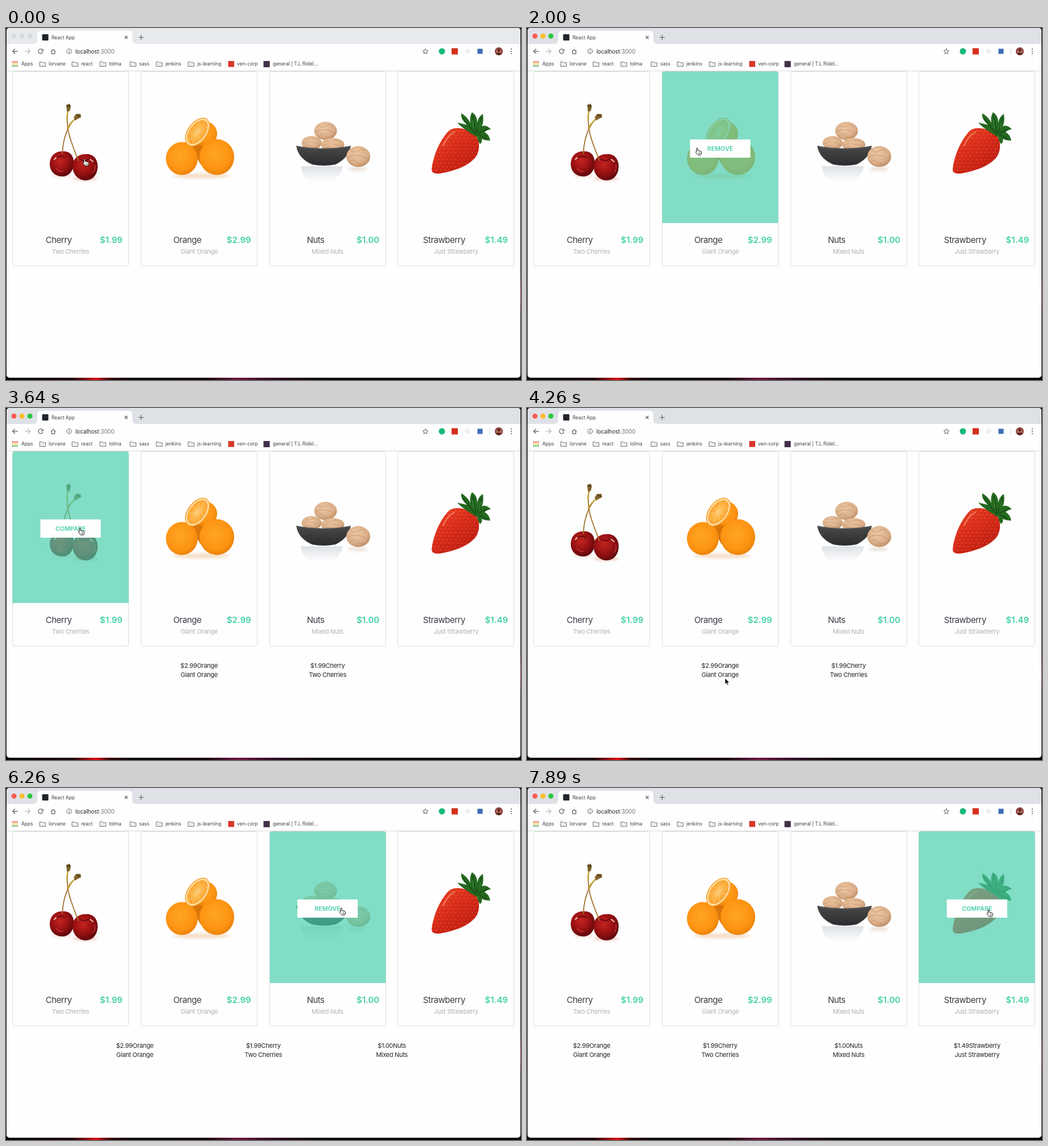
Animation, 905 px wide and 619 px high, one loop 8000 ms. Source, as an HTML page:

```html
<!DOCTYPE html>
<html lang="en">
<head>
<meta charset="utf-8">
<title>Product compare</title>
<style>
  html, body { margin: 0; width: 100%; height: 100%; overflow: hidden; background: #08040a; }
  svg { display: block; width: 100vw; height: 100vh; font-family: Inter, "Liberation Sans", sans-serif; }
  .ui { font-size: 8.4px; fill: #3c4043; }
  .name { font-size: 15px; letter-spacing: -.033em; fill: #393c45; text-anchor: middle; }
  .price { font-size: 15px; font-weight: 600; fill: #43d0a8; text-anchor: end; }
  .desc { font-size: 11px; letter-spacing: -.027em; fill: #b1b1b3; text-anchor: middle; }
  .item { font-size: 11px; letter-spacing: -.027em; fill: #212529; text-anchor: middle; }
  .label { font-size: 10.7px; font-weight: 600; text-anchor: middle; }
  .line { fill: none; stroke: #5f6368; stroke-width: 1.2; }
</style>
</head>
<body>
<svg id="stage" viewBox="0 0 905 619" preserveAspectRatio="none">
  <defs>
    <linearGradient id="desk">
      <stop offset="0" stop-color="#08040a"/><stop offset=".13" stop-color="#1c0308"/>
      <stop offset=".175" stop-color="#e00d12"/><stop offset=".2" stop-color="#3a040a"/>
      <stop offset=".24" stop-color="#0c040a"/><stop offset=".39" stop-color="#14040e"/>
      <stop offset=".45" stop-color="#6d1740"/><stop offset=".52" stop-color="#2c0a20"/>
      <stop offset=".62" stop-color="#08040a"/>
    </linearGradient>
    <linearGradient id="edge" x2="0" y2="1">
      <stop offset=".69" stop-color="#08040a"/><stop offset=".76" stop-color="#7a1747"/>
      <stop offset=".81" stop-color="#12040c"/>
    </linearGradient>
    <radialGradient id="cherry" cx=".42" cy=".38" r=".65">
      <stop offset="0" stop-color="#c3241f"/><stop offset=".55" stop-color="#9a1113"/>
      <stop offset="1" stop-color="#5a070a"/>
    </radialGradient>
    <radialGradient id="orange" cx=".45" cy=".42" r=".65">
      <stop offset="0" stop-color="#ffa526"/><stop offset=".65" stop-color="#fd9412"/>
      <stop offset="1" stop-color="#e67c06"/>
    </radialGradient>
    <radialGradient id="pulp">
      <stop offset="0" stop-color="#ffd084"/><stop offset=".45" stop-color="#fdb64a"/>
      <stop offset="1" stop-color="#fba42f"/>
    </radialGradient>
    <radialGradient id="nut" cx=".42" cy=".35" r=".75">
      <stop offset="0" stop-color="#edc8a2"/><stop offset=".6" stop-color="#dbb08a"/>
      <stop offset="1" stop-color="#b58258"/>
    </radialGradient>
    <linearGradient id="bowl" x2="0" y2="1">
      <stop offset="0" stop-color="#4b4a4b"/><stop offset="1" stop-color="#2c2b2d"/>
    </linearGradient>
    <linearGradient id="mirror" x2="0" y2="1">
      <stop offset="0" stop-color="#d3d8de"/><stop offset="1" stop-color="#fff"/>
    </linearGradient>
    <linearGradient id="berry" x2=".8" y2="1">
      <stop offset="0" stop-color="#ee4a2a"/><stop offset=".5" stop-color="#da2c1a"/>
      <stop offset="1" stop-color="#b91c12"/>
    </linearGradient>
    <radialGradient id="face"><stop offset=".3" stop-color="#c98a6c"/><stop offset="1" stop-color="#7b2a2c"/></radialGradient>
    <path id="berryShape" d="M779 180C790 172 813 176 826 190C833 199 833 214 826 226C814 242 790 251 762 256Q748 257 748 249C750 227 762 196 779 180Z"/>
    <clipPath id="berryClip"><use href="#berryShape"/></clipPath>
    <filter id="soft" x="-30%" y="-80%" width="160%" height="260%"><feGaussianBlur stdDeviation="2.2"/></filter>
  </defs>
</svg>
<script>
const stage = document.getElementById('stage');
const $ = id => document.getElementById(id);
const text = (x, y, cls, s, extra = '') => `<text x="${x}" y="${y}" class="${cls}" ${extra}>${s}</text>`;
const ball = (x, y, rx, ry, fill, extra = '') =>
  `<ellipse cx="${x}" cy="${y}" rx="${rx}" ry="${ry}" fill="${fill}" ${extra}/>`;
const box = (x, y, w, h, fill, extra = '') =>
  `<rect x="${x}" y="${y}" width="${w}" height="${h}" fill="${fill}" ${extra}/>`;
const path = (d, fill, extra = '') => `<path d="${d}" fill="${fill}" ${extra}/>`;
const curve = (d, color, width) => path(d, 'none', `stroke="${color}" stroke-width="${width}" stroke-linecap="round"`);

const LOOP = 8000, MINT = [72, 207, 173], PAGE = '#fefefe';
const STEPS = [0, 180, 840, 1040, 1230, 1370, 1540, 1700, 2000, 2600, 2750, 2900, 3050, 3190, 3640,
  3940, 4100, 4260, 4410, 4580, 4750, 4920, 5220, 5370, 5510, 5660, 5810, 5960, 6260,
  6710, 6860, 7000, 7150, 7300, 7440, 7590, 7740, 7890];

// shows: [enter, leave, press start, press end]; press = pointer over the button
const cards = [
  { name: 'Cherry', price: '$1.99', desc: 'Two Cherries', x: 11.5, mid: 113.5, art: drawCherry,
    labels: ['REMOVE', 'COMPARE'], click: 3640, shows: [[-400, 760, 9e3, 9e3], [2760, 3800, 2920, 3800]] },
  { name: 'Orange', price: '$2.99', desc: 'Giant Orange', x: 237.5, mid: 339.5, art: drawOrange,
    labels: ['COMPARE', 'REMOVE'], click: 2000, shows: [[940, 2735, 1230, 2540]] },
  { name: 'Nuts', price: '$1.00', desc: 'Mixed Nuts', x: 463.5, mid: 565, art: drawNuts,
    labels: ['COMPARE', 'REMOVE'], click: 6260, shows: [[5325, 6760, 5600, 6640]] },
  { name: 'Strawberry', price: '$1.49', desc: 'Just Strawberry', x: 688.5, mid: 790.8, art: drawBerry,
    labels: ['REMOVE', 'COMPARE'], click: 7890, shows: [[6815, 9e3, 6890, 9e3]] }
];
const picks = [cards[1], cards[0], cards[2], cards[3]];

// Pointer: time, x, y
const POINTER = [[0, 139, 236], [760, 139, 236], [1040, 262, 226], [1230, 300, 217], [2500, 300, 217],
  [2750, 222, 225], [2900, 134, 231], [3190, 131, 217], [3770, 131, 217], [3940, 150, 262],
  [4100, 256, 420], [4260, 350, 481], [4500, 351, 487], [4920, 334, 463], [5150, 334, 463],
  [5220, 400, 412], [5370, 530, 300], [5510, 601, 248], [5660, 596, 226], [5960, 590, 217],
  [6600, 590, 217], [6710, 625, 217], [7000, 831, 214], [7740, 812, 220], [8000, 812, 220]];

function drawCherry() {
  return ball(139, 265, 22, 3.5, '#f0cbc2', 'filter="url(#soft)"') +
    ball(99, 259, 17, 3.5, '#f4ddd5', 'filter="url(#soft)"') +
    path('M98 217C112 215 120 225 119 239C118 254 108 262 97 261C84 260 76 250 77 237C78 225 86 217 98 217Z', 'url(#cherry)') +
    path('M139 222C153 220 162 231 161 245C160 260 151 268 139 268C126 267 117 257 117 243C117 230 127 222 139 222Z', 'url(#cherry)') +
    curve('M90 228q7 -5 14 0M130 231q9 5 16 -1', '#6a0a0d', 1.8) +
    curve('M148 231l5 4M85 231l3 -3', '#f0c4bc', 1.8) +
    curve('M156 241q2 8 -3 13M88 247q5 6 11 5', '#c4352f', 1.6) +
    curve('M99 221C100 200 104 180 118 163', '#a0702c', 1.8) +
    curve('M127 233C117 205 103 180 109 144', '#a56f2a', 1.8) +
    curve('M108 176q4 -8 14 -17M107 160q0 -8 3 -17', '#c4a12d', 2.2) +
    path('M106 135l6 -2l2 5l-2 8l-5 1z', '#7b6129') + path('M119 157l4 -6l8 0l1 6l-6 3l-5 3z', '#846730') +
    curve('M107 137l5 0M125 154l5 1', '#4c3c1c', 2);
}

function drawOrange() {
  let wedges = '';
  for (let i = 0; i < 9; i++) {
    const a = i * Math.PI * 2 / 9;
    wedges += `M0 0L${(22 * Math.cos(a)).toFixed(1)} ${(13 * Math.sin(a)).toFixed(1)}`;
  }
  return ball(343, 260, 50, 4.5, '#f4dfc8', 'filter="url(#soft)"') +
    path('M322 204h38l-18 36z', '#d9760a') +
    ball(349, 186, 22, 22, 'url(#orange)') +
    ball(309, 229.5, 28, 29, 'url(#orange)') + ball(370.5, 227, 30.5, 31.5, 'url(#orange)') +
    `<g transform="translate(336.5 183) rotate(-54)">` + ball(0, 0, 28.5, 17.5, '#f9a22b') +
    ball(0, 0, 27, 15.8, '#fde0ac') + ball(0, 0, 24, 13.6, 'url(#pulp)') +
    curve(wedges, '#fecb78', .8) + '</g>';
}

function walnut(x, y, rx, ry) {
  return `<g transform="translate(${x} ${y}) scale(${rx / 20} ${ry / 16})">` + ball(0, 0, 20, 16, 'url(#nut)') +
    curve('M-18 2C-8 -5 6 -3 18 6M-12 -9q7 5 13 0t11 3M-14 8q6 -5 11 0t13 2', '#c0906a', .8) + '</g>';
}

function drawNuts() {
  return path('M518 243H592Q590 256 578 266Q566 273 555 270Q540 274 528 266Q519 256 518 243Z', 'url(#mirror)', 'opacity=".75"') +
    ball(618, 248, 17, 4, '#ece5df', 'filter="url(#soft)"') +
    walnut(561.5, 181, 20, 16) + walnut(537, 202, 17.5, 12) + walnut(574, 205, 20.5, 11.5) +
    path('M510 207Q558 216 606 207Q603 228 579 240Q558 244 538 240Q513 229 510 207Z', 'url(#bowl)') +
    curve('M512 208.5Q558 217 604 208.5', '#5f5e60', 1) + walnut(619, 226, 21, 18.5);
}

function drawBerry() {
  let seeds = '';
  for (let r = 0; r < 14; r++) for (let c = 0; c < 14; c++) {
    const x = 742 + c * 7.4 + (r % 2) * 3.7, y = 176 + r * 6.2;
    seeds += ball(x, y, .8, 1.1, '#ee8a45', 'opacity=".6"') + ball(x + .7, y + 1.7, 1.6, .8, '#a3160f', 'opacity=".5"');
  }
  return '<use href="#berryShape" fill="url(#berry)"/><g clip-path="url(#berryClip)">' + seeds +
    curve('M768 207q8 -18 20 -24', '#f6755a', 2.5) + '</g>' +
    path('M828 192C816 185 800 175 793 166Q803 169 810 170Q798 160 800 150Q811 156 816 167Q814 156 819 148Q829 155 828 167Q830 156 838 151Q840 165 836 173Q843 169 852 178Q845 179 841 183Q849 187 851 198Q842 198 836 195Q838 200 833 204Q829 199 828 192Z', '#25691f') +
    curve('M825 187L803 158M826 185L820 154M828 184L836 157M830 185L846 178M831 188L845 195', '#15481a', 1.5) +
    curve('M822 176l-2 -14M831 177l3 -12', '#4c9440', 1);
}

function folder(x, label) {
  return path(`M${x + .5} 59.5h4l1.3 1.4h5.2v6.6h-10.5z`, '#eceeef', 'stroke="#74787c"') +
    text(x + 16.5, 66.3, 'ui', label);
}

function drawBrowser() {
  let dots = '', lights = '';
  ['#e8453c', '#f9bb2d', '#3aa757'].forEach((c, row) => {
    for (let i = 0; i < 3; i++) dots += box(11 + i * 3.6, 58.5 + row * 3.6, 2.3, 2.3, c);
  });
  ['#fc5b57', '#fdbc2e', '#28c840'].forEach((c, i) => lights += ball(14 + i * 14, 14.3, 4.5, 4.5, c, 'class="light"'));
  const arrow = (x, dir, color) =>
    path(`M${x - 4 * dir} 41h${9 * dir}M${x} 36.8l${-4.4 * dir} 4.2l${4.4 * dir} 4.2`, 'none', `stroke="${color}" stroke-width="1.25"`);
  return box(0, 614, 905, 5, 'url(#desk)') + box(903, 0, 2, 619, 'url(#edge)') +
    box(1, 0, 903, 615, PAGE, 'rx="5"') +
    path('M1 28V5Q1 0 6 0H899Q904 0 904 5V28Z', '#dee1e6', 'id="strip"') + lights +
    path('M48 28Q55 28 55 21V11Q55 5 61 5H216Q222 5 222 11V21Q222 28 229 28Z', PAGE) +
    box(63.5, 11, 11, 11, '#20252b', 'rx="1"') + text(80, 19.6, 'ui', 'React App') +
    path('M208.7 14l5 5m0 -5l-5 5M233 16.5h9m-4.5 -4.5v9', 'none', 'class="line"') +
    arrow(16, 1, '#5f6368') + arrow(38, -1, '#babcbe') +
    path('M64 38.4A4 4 0 1 0 64.8 42M65 36.8v3.4h-3.6M79 41.5l4 -4l4 4M80.3 41v4.3h5.4V41', 'none', 'class="line"') +
    '<circle cx="111" cy="41" r="4.2" class="line" style="stroke-width:1"/>' +
    path('M111 40.5v3M111 38.5v1', 'none', 'class="line"') +
    text(122, 44.6, 'ui', 'localhost<tspan fill="#6b7075">:3000</tspan>', 'style="font-size:9.7px;fill:#202124"') +
    path('M737 36.5l1.3 3.1 3.4 .3 -2.6 2.2 .8 3.3 -2.9 -1.8 -2.9 1.8 .8 -3.3 -2.6 -2.2 3.4 -.3z', 'none', 'class="line" style="stroke-width:1"') +
    ball(766, 41, 5.5, 5.5, '#17b978') + box(783, 35.5, 11, 11, '#d5301f') + ball(811, 41, 4.5, 4.5, '#eeeff0') +
    box(828.5, 36.5, 9, 9, '#3c6db4') + box(850, 36, 1, 11, '#dadce0') + ball(866, 41, 7, 7, 'url(#face)') +
    ball(866, 39, 2.4, 2.8, '#5b2523') + path('M861 45.8q5 -6 10 0q-5 4 -10 0z', '#5b2523') +
    [37, 41, 45].map(y => ball(888, y, 1.1, 1.1, '#5f6368')).join('') +
    dots + text(27, 66.3, 'ui', 'Apps') +
    folder(58.5, 'lorvane') + folder(115.5, 'react') + folder(164.5, 'tolma') + folder(217.5, 'sass') +
    folder(263.5, 'jenkins') + folder(319.5, 'js-learning') +
    box(390.5, 58, 10.5, 10.5, '#d8392b') + text(406, 66.3, 'ui', 'ven-corp') +
    box(452.5, 58, 11, 11, '#43304b') + text(469, 66.3, 'ui', 'general | T.L Ridel...') +
    box(1, 75, 903, 1, '#d6d8da');
}

function drawCard(c, i) {
  const w = 204;
  return box(c.x, 76.5, w, 342, PAGE, 'rx="3.5" stroke="#dcdcdc"') + c.art() +
    text(c.mid - 20.9, 377.8, 'name', c.name) + text(c.mid + 91.2, 377.8, 'price', c.price) +
    text(c.mid, 396.5, 'desc', c.desc) +
    path(`M${c.x} 343V80Q${c.x} 76.5 ${c.x + 3.5} 76.5H${c.x + w - 3.5}Q${c.x + w} 76.5 ${c.x + w} 80V343Z`, `rgb(${MINT})`, `id="veil${i}"`) +
    `<g id="btn${i}">` + box(-52.3, -15.3, 104.6, 30.6, '#fff', `id="fill${i}" stroke="#fff" stroke-width="1.5"`) +
    text(0, 4, 'label', '', `id="label${i}"`) + '</g>';
}

stage.insertAdjacentHTML('beforeend', drawBrowser() + cards.map(drawCard).join('') + '<g id="list"></g>' +
  '<g id="pointer"><g id="hand" stroke="#111" stroke-width="1" stroke-linejoin="round">' +
  path('M0 1.2Q0 0 1.1 0T2.2 1.2V4.6L7 5.6Q8.8 6.2 8.6 8.2L7.8 11Q7.5 12.3 6.3 12.3H3Q2 12.3 1.3 11.2L-1.7 7.4Q-1.8 6.1 -.4 6.4L0 6.8Z', '#fff') +
  curve('M4 8v2.4M5.8 8v2.4', '#111', .7) + '</g>' +
  path('M0 0V10.8L2.5 8.6L4.2 12.5L6.1 11.7L4.4 7.9H7.7Z', '#000', 'id="arrow" stroke="#fff" stroke-width=".8"') + '</g>');

const clamp = v => Math.min(1, Math.max(0, v));
// cubic-bezier(.25, .1, .25, 1)
function ease(x) {
  let lo = 0, hi = 1;
  for (let i = 0; i < 20; i++) {
    const s = (lo + hi) / 2;
    if (.75 * s * (1 - s) + s ** 3 < x) lo = s; else hi = s;
  }
  return .3 * lo * (1 - lo) ** 2 + 3 * lo * lo * (1 - lo) + lo ** 3;
}
const ramp = (t, start, ms) => ease(clamp((t - start) / ms));

function pointerAt(t) {
  const i = Math.max(1, POINTER.findIndex(p => p[0] >= t));
  const [t0, x0, y0] = POINTER[i - 1], [t1, x1, y1] = POINTER[i];
  const k = clamp((t - t0) / (t1 - t0));
  return [x0 + (x1 - x0) * k, y0 + (y1 - y0) * k];
}

function poseCard(c, i, t) {
  const show = c.shows.filter(s => t >= s[0]).pop();
  const [enter, leave, press, release] = show || [9e3, 9e3, 9e3, 9e3];
  const leaving = t > leave;
  const p = t < 180 ? 0 : leaving ? 1 - ramp(t, leave, 500) : ramp(t, enter, 500);
  const hover = t > release ? 1 - ramp(t, release, 180) : ramp(t, press, 280);
  const lift = 31 * (1 - p) ** (leaving ? .45 : 1.3);
  $('veil' + i).setAttribute('opacity', .68 * p);
  $('btn' + i).setAttribute('opacity', p);
  $('btn' + i).setAttribute('transform', `translate(${c.mid} ${212 - lift}) scale(${1 + lift / 320})`);
  $('fill' + i).setAttribute('fill-opacity', hover);
  const label = $('label' + i);
  label.textContent = c.labels[t < c.click ? 0 : 1];
  label.setAttribute('fill', `rgb(${MINT.map(v => Math.round(255 + (v - 255) * hover))})`);
}

let shown = -1;
function showList(n) {
  if (n === shown) return;
  shown = n;
  $('list').innerHTML = picks.slice(0, n).map((c, i) => {
    const x = 452.2 + (i - (n - 1) / 2) * 225.8;
    return text(x, 456.5, 'item', c.price + c.name) + text(x, 473.3, 'item', c.desc);
  }).join('');
}

function draw(t) {
  const active = t >= 180;
  $('strip').setAttribute('fill', active ? '#dee1e6' : '#e7eaed');
  document.querySelectorAll('.light').forEach(l => l.style.fill = active ? '' : '#d8dbde');
  cards.forEach((c, i) => poseCard(c, i, t));
  showList(t < 3640 ? 0 : t < 6260 ? 2 : t < 7890 ? 3 : 4);
  const [x, y] = pointerAt(t);
  const onImage = y < 343 && cards.some(c => x > c.x && x < c.x + 204);
  $('hand').style.display = onImage ? '' : 'none';
  $('arrow').style.display = onImage ? 'none' : '';
  $('pointer').setAttribute('transform', `translate(${x - 2} ${y - 6})`);
}

const begin = performance.now();
let last = -1;
function tick() {
  const now = (performance.now() - begin) % LOOP;
  const t = STEPS.filter(s => s <= now).pop() ?? 0;
  if (t !== last) draw(last = t);
  requestAnimationFrame(tick);
}
tick();
</script>
</body>
</html>
```
